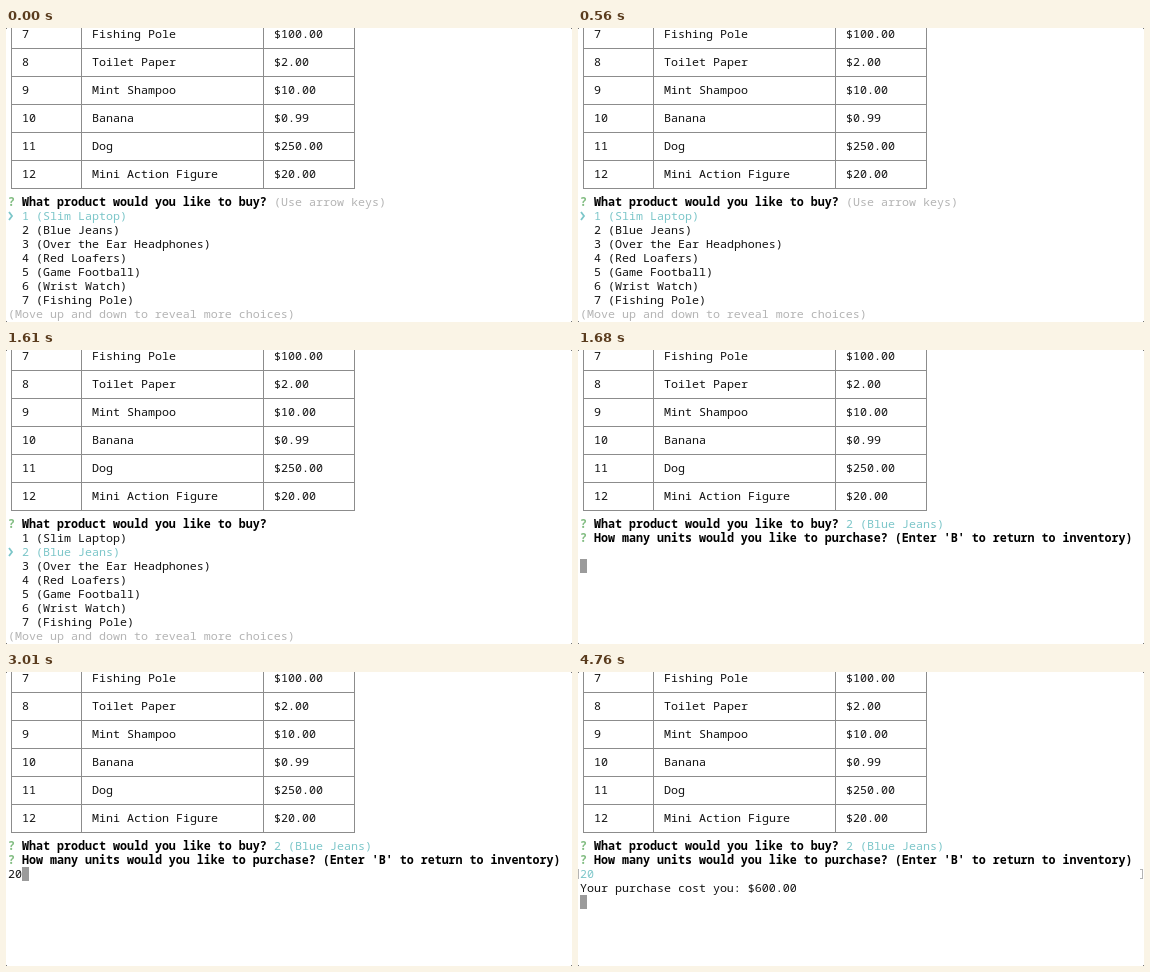
An HTML page with a canvas for the animation above (8 s loop, 566 px wide and 294 px high).

```html
<!DOCTYPE html>
<html lang="en">
<head>
<meta charset="utf-8">
<title>Shop prompt</title>
<style>
  html, body { margin: 0; width: 100%; height: 100%; overflow: hidden; background: #fff; }
  canvas { display: block; width: 566px; height: 294px; }
</style>
</head>
<body>
<canvas id="stage" width="566" height="294"></canvas>
<script>
const ctx = document.getElementById('stage').getContext('2d');
const W = 566, H = 294, LOOP = 8000;
const CELL = 7, ROW = 14, LEFT = 2, TOP = -1;
const INK = '#111', GREY = '#b4b4b4', CYAN = '#7cc6c9', GREEN = '#83bd83';
const LINE = '#8c8c8c', CURSOR = '#9b9b9b';
const FAMILY = '"Noto Sans Mono", "DejaVu Sans Mono", monospace';

const stock = [
  ['7', 'Fishing Pole', '$100.00'],
  ['8', 'Toilet Paper', '$2.00'],
  ['9', 'Mint Shampoo', '$10.00'],
  ['10', 'Banana', '$0.99'],
  ['11', 'Dog', '$250.00'],
  ['12', 'Mini Action Figure', '$20.00']
];
const choices = ['Slim Laptop', 'Blue Jeans', 'Over the Ear Headphones',
  'Red Loafers', 'Game Football', 'Wrist Watch', 'Fishing Pole'];
const PROMPT = 12; // terminal row of the first question

// Event times in ms
const MOVE = 1190, CHOOSE = 1680, KEY_1 = 2870, KEY_2 = 3010, ENTER = 4690, RESULT = 4760;

const cellX = col => LEFT + col * CELL;
const rowY = row => TOP + row * ROW;

function text(str, col, row, color = INK, weight = 500) {
  ctx.font = `${weight} ${CELL / 0.6}px ${FAMILY}`;
  ctx.fillStyle = color;
  ctx.fillText(str, cellX(col), rowY(row) + 11);
}

function rect(x, y, w, h, color) {
  ctx.fillStyle = color;
  ctx.fillRect(x, y, w, h);
}

function cursor(col, row) {
  rect(cellX(col), rowY(row), CELL, ROW, CURSOR);
}

function table() {
  const edges = [0, 10, 36, 49].map(col => cellX(col) + 3);
  const bottom = rowY(PROMPT - 1) + 7;
  for (const x of edges) rect(x, 0, 1, bottom + 1, LINE);
  stock.forEach(([id, name, price], i) => {
    const row = i * 2;
    text(id, 2, row);
    text(name, 12, row);
    text(price, 38, row);
    rect(edges[0], rowY(row + 1) + 7, edges[3] - edges[0] + 1, 1, LINE);
  });
}

function question(str, row) {
  text('?', 0, row, GREEN, 600);
  text(str, 2, row, '#000', 700);
}

function pointer(row) {
  const y = rowY(row) + 7;
  ctx.strokeStyle = CYAN;
  ctx.lineWidth = 1.8;
  ctx.beginPath();
  ctx.moveTo(3, y - 4);
  ctx.lineTo(6, y);
  ctx.lineTo(3, y + 4);
  ctx.stroke();
}

function menu(selected) {
  choices.forEach((name, i) => {
    const row = PROMPT + 1 + i;
    text(`${i + 1} (${name})`, 2, row, i === selected ? CYAN : INK);
  });
  pointer(PROMPT + 1 + selected);
  text('(Move up and down to reveal more choices)', 0, PROMPT + 8, GREY);
}

function brackets(row) {
  const y = rowY(row) + 2;
  rect(0, y, 1, 10, GREY);
  rect(564, y, 1, 10, GREY);
  rect(562, y, 2, 1, GREY);
  rect(562, y + 9, 2, 1, GREY);
}

function purchase(t) {
  const input = PROMPT + 2;
  text('2 (Blue Jeans)', 38, PROMPT, CYAN);
  question("How many units would you like to purchase? (Enter 'B' to return to inventory)", PROMPT + 1);
  if (t < KEY_1) {
    cursor(0, input + 1);
  } else if (t < ENTER) {
    const typed = t < KEY_2 ? '2' : '20';
    text(typed, 0, input);
    cursor(typed.length, input);
  } else {
    text('20', 0, input, CYAN);
    brackets(input);
    if (t >= RESULT) text('Your purchase cost you: $600.00', 0, input + 1);
    cursor(0, input + (t < RESULT ? 1 : 2));
  }
}

function corners() {
  for (const x of [0, W - 1])
    for (const y of [0, H - 1]) rect(x, y, 1, 1, '#777');
}

function draw(t) {
  rect(0, 0, W, H, '#fff');
  table();
  question('What product would you like to buy?', PROMPT);
  if (t < CHOOSE) {
    if (t < MOVE) text('(Use arrow keys)', 38, PROMPT, GREY);
    menu(t < MOVE ? 0 : 1);
  } else {
    purchase(t);
  }
  corners();
}

const start = performance.now();
function tick() {
  draw((performance.now() - start) % LOOP);
  requestAnimationFrame(tick);
}
tick();
</script>
</body>
</html>
```
